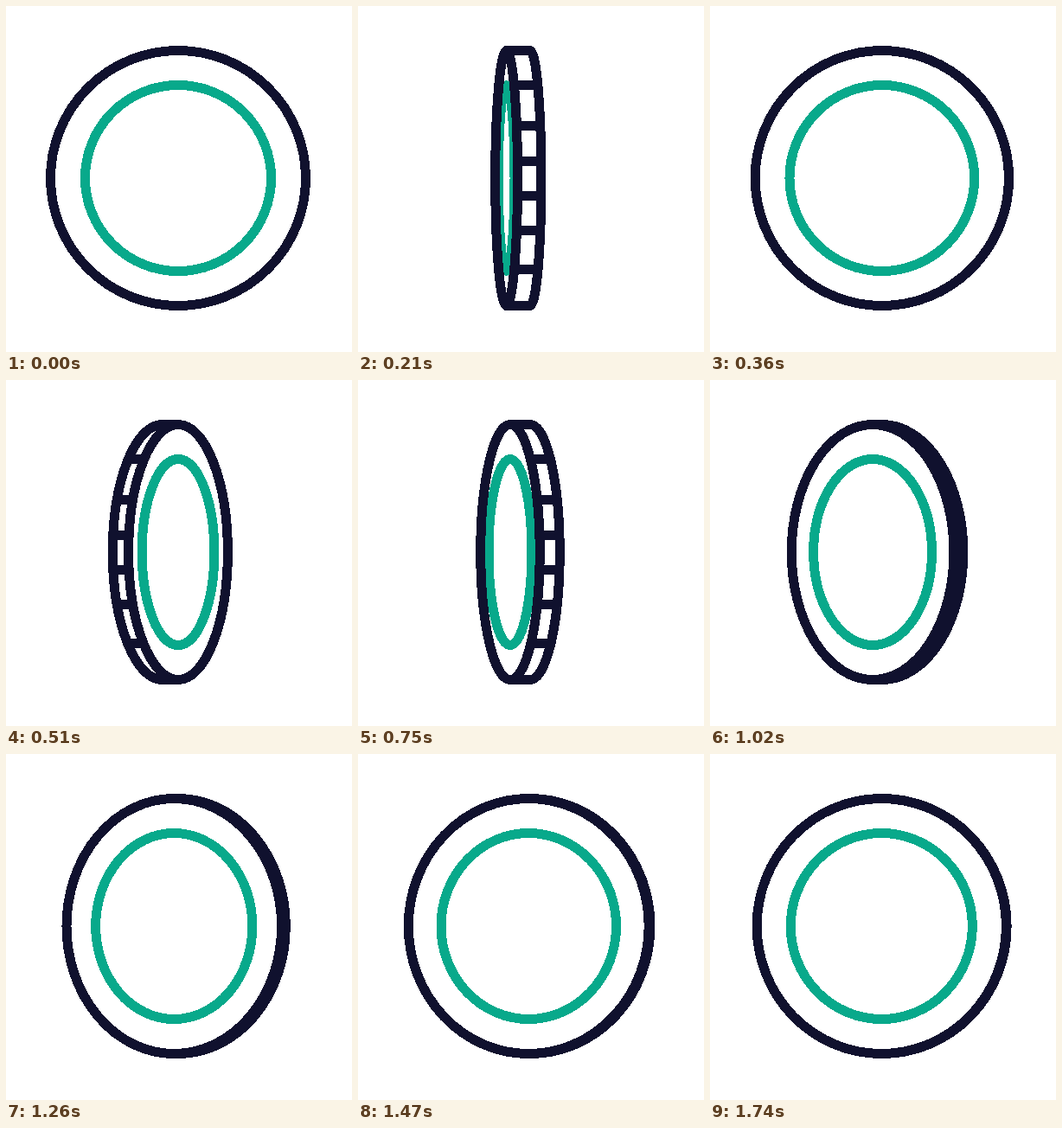
Animation, 400 px wide and 400 px high, one loop 2.3 s. Source, as an HTML page:

```html
<!DOCTYPE html>
<html lang="en">
<head>
<meta charset="utf-8">
<title>Spinning coin</title>
<style>
  html, body { margin: 0; width: 100%; height: 100%; overflow: hidden; background: #fff; }
  svg { display: block; width: 100%; height: 100%; fill: none; stroke-width: 11; shape-rendering: crispEdges; }
</style>
</head>
<body>
<svg viewBox="0 0 400 400">
  <ellipse id="ring" cy="199" ry="107.5" stroke="#08a98b"/>
  <path id="edge" stroke="#10112e"/>
  <ellipse id="face" cy="199" ry="147.5" stroke="#10112e"/>
</svg>
<script>
const LOOP = 2300, STEP = 30, LAST = 1740, SPIN = 1800;
const CENTER = 199, RADIUS = 147.5, RING = 107.5, DEPTH = 30;
const REST = 0.023; // the coin settles just short of face-on
const RIDGES = [91.5, 138.5, 179, 219, 259.5, 304.5];
const [ring, edge, face] = ['ring', 'edge', 'face'].map(id => document.getElementById(id));

const bezier = (s, a, b) => 3 * s * (1 - s) ** 2 * a + 3 * s * s * (1 - s) * b + s ** 3;

function ease(x) {
  let low = 0, high = 1;
  for (let i = 0; i < 30; i++) {
    const mid = (low + high) / 2;
    if (bezier(mid, 0.167, 0.115) < x) low = mid; else high = mid;
  }
  return bezier(low, 0.167, 1);
}

function setEllipse(node, cx, rx) {
  node.setAttribute('cx', cx);
  node.setAttribute('rx', rx);
}

function draw(time) {
  const t = Math.min(Math.floor((time % LOOP) / STEP) * STEP, LAST);

  // Quarter turns left: the edge shows on the left, then on the right.
  const left = t ? Math.hypot(4 * (1 - ease(t / SPIN)), REST) : 4;
  const phase = left % 2;
  const open = Math.abs(1 - phase);
  const side = phase < 1 ? 1 : -1;

  const rx = Math.max(RADIUS * open, 0.01);
  const shift = CENTER - DEPTH * (1 - open);
  const front = side > 0 ? shift : CENTER;
  const back = side > 0 ? CENTER : shift;

  setEllipse(face, front, rx);
  setEllipse(ring, front, Math.max(RING * open, 0.01));

  const top = CENTER - RADIUS, bottom = CENTER + RADIUS;
  const rim = `M${front} ${top}H${back}A${rx} ${RADIUS} 0 0 ${side > 0 ? 1 : 0} ${back} ${bottom}H${front}`;
  const bars = RIDGES.map(y => {
    const reach = side * rx * Math.sqrt(1 - ((y - CENTER) / RADIUS) ** 2);
    return `M${front + reach} ${y}H${back + reach}`;
  });
  edge.setAttribute('d', rim + bars.join(''));
}

const start = performance.now();
function tick() {
  draw(performance.now() - start);
  requestAnimationFrame(tick);
}
tick();
</script>
</body>
</html>
```
